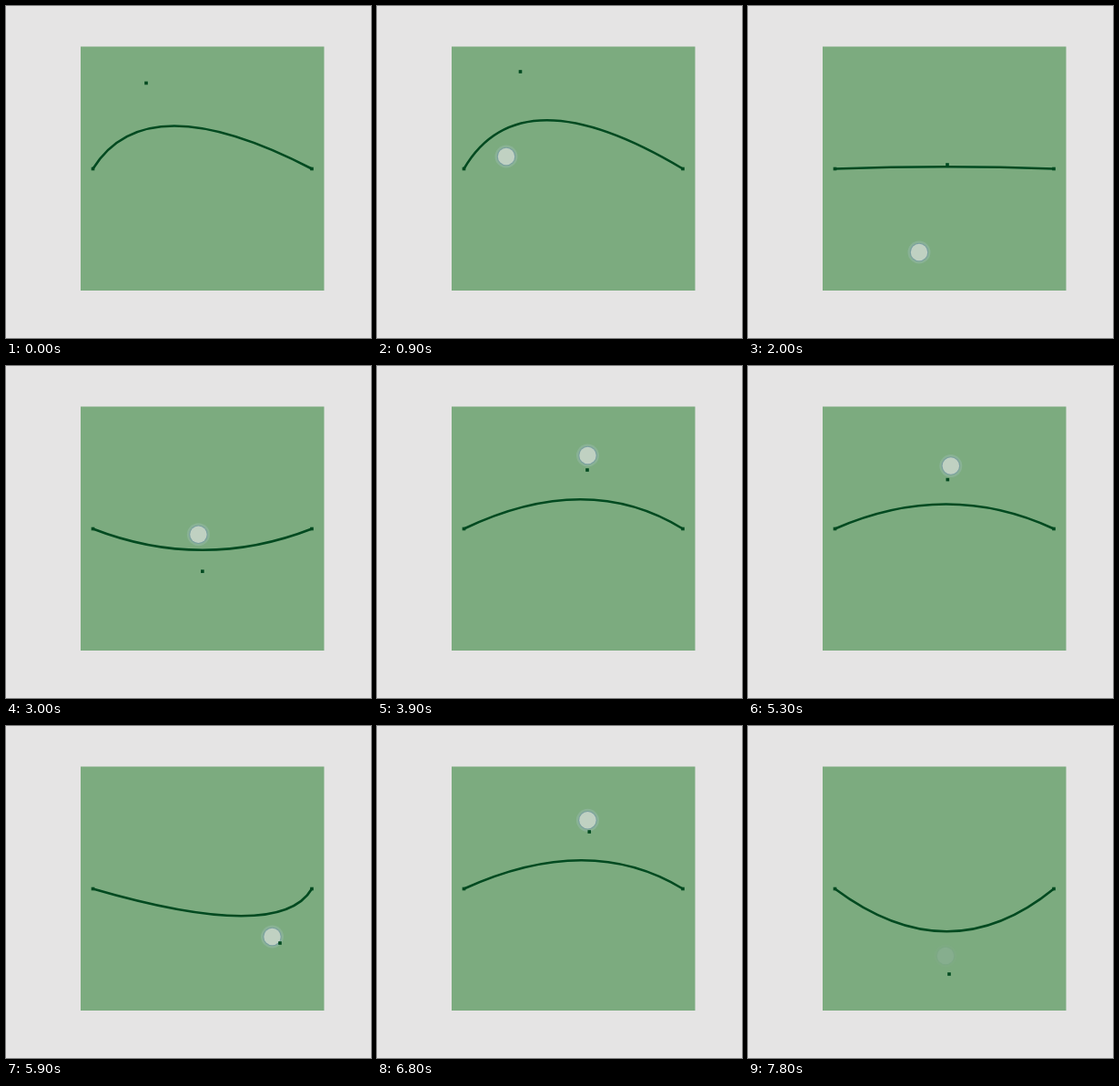
Animation, 401 px wide and 364 px high, one loop 8.3 s. Source, as an HTML page with a canvas:

```html
<!DOCTYPE html>
<html>
<head>
<meta charset="utf-8">
<style>
html, body { margin: 0; height: 100%; overflow: hidden; background: #e5e4e4; }
canvas { display: block; }
</style>
</head>
<body>
<canvas width="401" height="364"></canvas>
<script>
const ctx = document.querySelector('canvas').getContext('2d');
const LOOP = 8300, STEP = 100, DARK = '#004a20';
const LEFT = 95.5, RIGHT = 336, BASE = 178.5;

// Key poses: time, curve handle x and y, pointer x and y.
const poses = [
  [300, 154, 84.5, 152, 84],
  [900, 157.5, 72, 142, 165],
  [2000, 219, 174, 188, 270],
  [2450, 205, 288, 193, 255],
  [3900, 231, 114, 231.5, 98],
  [4800, 185, 289, 172.5, 264],
  [5400, 230, 108, 235, 95],
  [5900, 301, 238, 292.5, 231],
  [6700, 237, 112, 235, 100],
  [7800, 221, 272, 217, 252]
];

const clamp = (v, lo = 0, hi = 1) => Math.min(hi, Math.max(lo, v));

// Smooth cubic motion through the key poses.
function poseAt(time) {
  const last = poses.length - 1;
  const t = clamp(time, poses[0][0], poses[last][0]);
  let i = 0;
  while (i < last - 1 && t >= poses[i + 1][0]) i++;
  const a = poses[i], b = poses[i + 1], span = b[0] - a[0], u = (t - a[0]) / span;
  const slope = (j, k) => {
    const p = poses[Math.max(0, j - 1)], n = poses[Math.min(last, j + 1)];
    return (n[k] - p[k]) / (n[0] - p[0]) * span;
  };
  return [1, 2, 3, 4].map(k =>
    a[k] + (b[k] - a[k]) * u * u * (3 - 2 * u) +
    slope(i, k) * u * (1 - u) ** 2 - slope(i + 1, k) * u * u * (1 - u));
}

function disc(x, y, r, color) {
  ctx.fillStyle = color;
  ctx.beginPath();
  ctx.arc(x, y, r, 0, 2 * Math.PI);
  ctx.fill();
}

function dot(x, y) {
  ctx.fillStyle = DARK;
  ctx.fillRect(x - 1.8, y - 1.8, 3.6, 3.6);
}

function draw(t) {
  const [hx, hy, px, py] = poseAt(t);

  ctx.fillStyle = '#e5e4e4';
  ctx.fillRect(0, 0, 401, 364);
  ctx.fillStyle = '#7cab7f';
  ctx.fillRect(82, 44.5, 267.5, 267.5);

  ctx.strokeStyle = DARK;
  ctx.lineWidth = 2.6;
  ctx.beginPath();
  ctx.moveTo(LEFT, BASE);
  ctx.quadraticCurveTo(hx, hy, RIGHT, BASE);
  ctx.stroke();

  ctx.globalAlpha = clamp((t - 300) / 200) * (1 - 0.86 * clamp((t - 7500) / 300));
  disc(px, py, 12.5, 'rgba(150,185,170,.5)');
  disc(px, py, 10.3, '#7a9fa0');
  disc(px, py, 9.2, '#c0d1c2');
  ctx.globalAlpha = 1;

  dot(LEFT, BASE);
  dot(RIGHT, BASE);
  dot(hx, hy);
}

function frame() {
  draw(Math.floor(performance.now() % LOOP / STEP) * STEP);
  requestAnimationFrame(frame);
}
frame();
</script>
</body>
</html>
```
